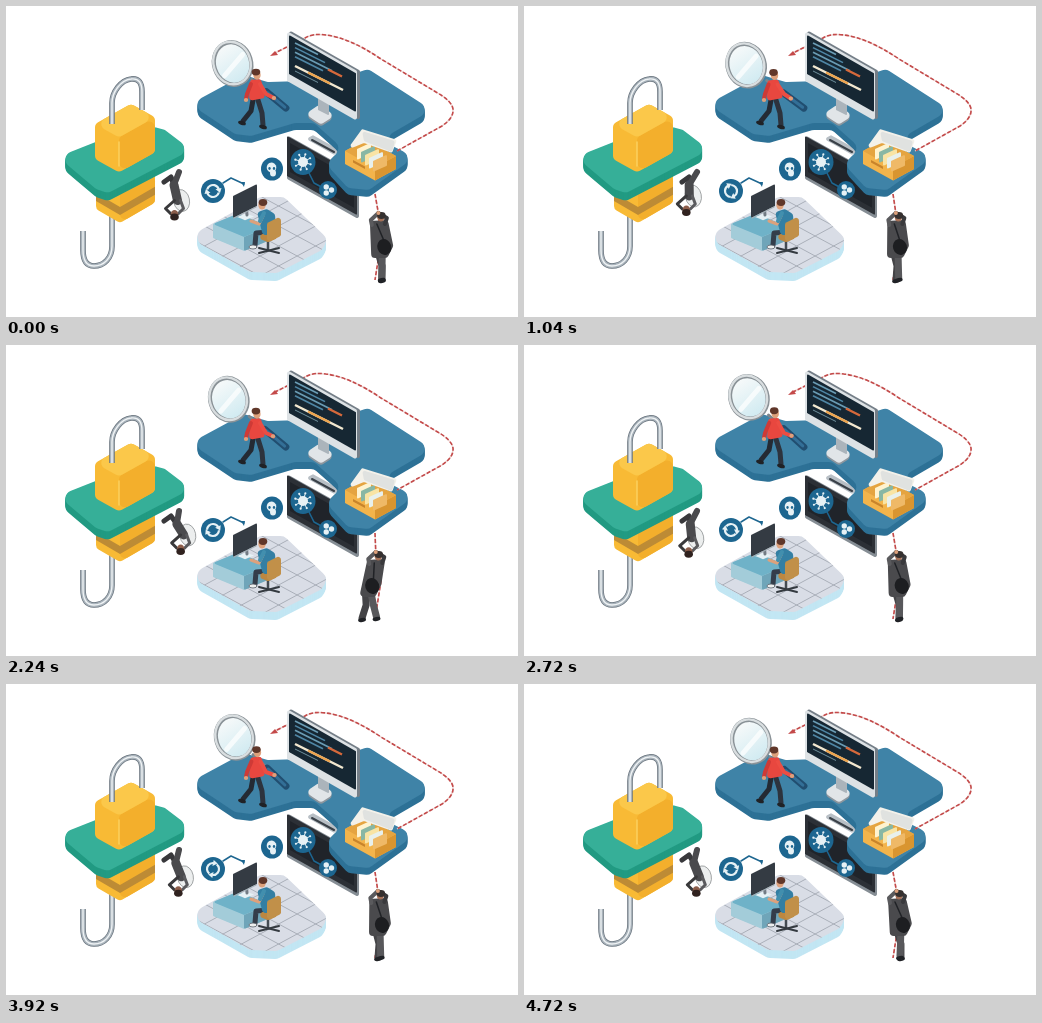
These frames come from a looping animation (512 px wide and 311 px high, 4.8 s). An HTML page with a canvas:

```html
<!DOCTYPE html>
<html lang="en">
<head>
<meta charset="utf-8">
<title>Data security scene</title>
<style>
html, body { margin: 0; width: 100%; height: 100%; overflow: hidden; background: #fff; }
canvas { display: block; width: 512px; height: 311px; }
</style>
</head>
<body>
<canvas id="stage" width="512" height="311"></canvas>
<script>
const ctx = document.getElementById('stage').getContext('2d');
const LOOP = 4800, STEP = 80, TAU = Math.PI * 2;
const SKIN = '#dda17c', HAIR = '#60372a', SUIT = '#4a4a4d', INK = '#202226';
const BLUE = '#1d6690', PALE = '#e6f1f5', RED = '#c44a4a';

// Wave with a whole number of cycles per loop; peak is a fraction of one cycle.
const wave = (t, cycles, peak = 0) => Math.cos(TAU * (t / LOOP * cycles - peak));
const shift = (p, dx, dy) => p.map(([x, y]) => [x + dx, y + dy]);

function tracePoly(p, r) {
  const last = p[p.length - 1];
  ctx.beginPath();
  ctx.moveTo((last[0] + p[0][0]) / 2, (last[1] + p[0][1]) / 2);
  p.forEach((a, i) => ctx.arcTo(...a, ...p[(i + 1) % p.length], r));
  ctx.closePath();
}
function poly(p, fill, r = 0) {
  tracePoly(p, r);
  ctx.fillStyle = fill;
  ctx.fill();
}
function line(p, color, w = 1, cap = 'round') {
  ctx.beginPath();
  p.forEach(q => ctx.lineTo(...q));
  ctx.lineWidth = w;
  ctx.lineCap = cap;
  ctx.lineJoin = 'round';
  ctx.strokeStyle = color;
  ctx.stroke();
}
function oval(x, y, rx, ry, fill, tilt = 0, edge, w = 1) {
  ctx.beginPath();
  ctx.ellipse(x, y, rx, ry, tilt, 0, TAU);
  if (fill) { ctx.fillStyle = fill; ctx.fill(); }
  if (edge) { ctx.strokeStyle = edge; ctx.lineWidth = w; ctx.stroke(); }
}
function slab(p, r, depth, top, side) {
  for (let d = depth; d > 0; d--) poly(shift(p, 0, d), side, r);
  poly(p, top, r);
}
// Upright panel whose horizontal edges have slope k.
function panel(x, y, w, h, k, fill, r = 0) {
  poly([[x, y], [x + w, y + w * k], [x + w, y + w * k + h], [x, y + h]], fill, r);
}
// Flat parallelogram from its left corner: a runs right-down, b right-up.
function tile(x, y, a, b, k, fill, r = 0) {
  poly([[x, y], [x + b, y - b * k], [x + a + b, y + (a - b) * k], [x + a, y + a * k]], fill, r);
}
function box(x, y, a, b, h, k, [top, left, right], r = 0) {
  const rise = (a - b) * k;
  poly([[x, y], [x + b, y - b * k], [x + a + b, y + rise], [x + a + b, y + rise + h],
    [x + a, y + a * k + h], [x, y + h]], left, r);
  panel(x + a, y + a * k, b, h, -k, right, r);
  tile(x, y, a, b, k, top, r);
}
function tube(path) {
  const p = new Path2D(path);
  ctx.lineCap = 'butt';
  [['#66717b', 5.6], ['#a9b3bb', 4.2], ['#eef2f4', 1.4]].forEach(([color, w]) => {
    ctx.strokeStyle = color;
    ctx.lineWidth = w;
    ctx.stroke(p);
  });
}
function head(x, y, hairX, hairY, skin = SKIN, hair = HAIR) {
  oval(x, y, 3.7, 4.6, skin);
  oval(x + hairX, y + hairY, 4.3, 3.4, hair);
}
function ropeLine(path, offset = 0) {
  const p = new Path2D(path);
  ctx.lineCap = 'butt';
  ctx.strokeStyle = '#ecd2d0';
  ctx.lineWidth = 1.4;
  ctx.stroke(p);
  ctx.setLineDash([4, 2]);
  ctx.lineDashOffset = offset;
  ctx.strokeStyle = RED;
  ctx.lineWidth = 1.6;
  ctx.stroke(p);
  ctx.setLineDash([]);
}

function lockScene(t) {
  const yellow = ['#fbc84a', '#f8ba35', '#f3af2c'];
  tube('M106 208V240C106 252 98 260 88 260C79 260 77 252 77 244V225');
  box(90, 173, 24, 35, 30, 0.58, yellow, 5);
  panel(90, 187, 24, 8, 0.58, '#bd8b35');
  panel(114, 201, 35, 8, -0.58, '#bd8b35');
  upsideDownMan(t);
  slab([[52, 151], [92, 135], [148, 121], [159, 124], [185, 144], [102, 187], [90, 183]],
    8, 8, '#36af98', '#219a82');
  box(89, 118, 24, 36, 35, 0.56, yellow, 6);
  line([[113, 136], [113, 160]], '#fbd15f', 1.5);
  tube('M106 118V97C106 86 115 74 125 73C133 72 136 77 136 86V104');
}

// Swings like a pendulum from the underside of the platform.
function upsideDownMan(t) {
  const swing = -wave(t, 6, 0.25);
  const x = 168.5 + 6.5 * swing, y = 209.5 - 5 * swing * swing;
  const hip = [168 + 3 * swing, 179], chest = [x + 3, y - 15];
  oval(x + 7, y - 15, 8, 11, '#eceeee', -0.2, '#8b8e90', 0.8);
  line([[158, 176], [165, 171], hip], '#38383b', 5);
  line([[173, 166], hip], SUIT, 6);
  line([hip, chest], SUIT, 9);
  [-1, 1].forEach(side => line([[chest[0] + 3 * side, chest[1]], [x + 9 * side, y - 7],
    [x + 4 * side, y - 2]], side < 0 ? '#39393b' : '#5a5a5d', 3));
  head(x, y - 1, 0, 2.5, '#8c5d4a', '#30221f');
}

function lowerMonitor() {
  panel(281, 129, 72, 44, 0.56, '#858d94', 2);
  panel(281, 130, 70, 40, 0.56, '#2c3036', 1);
  panel(284, 137, 64, 29, 0.56, '#20242a');
  tile(300, 133, 28, 7, 0.56, '#b8bfc5', 2);
  line([[306, 134], [328, 146]], '#3a4148', 2);
  line([[302, 165], [308, 177], [321, 184]], BLUE, 1.6);
  oval(297, 156, 12.5, 13, BLUE);
  for (let i = 0; i < 8; i++) {
    const a = i * TAU / 8 + 0.3, tip = [297 + 8 * Math.cos(a), 156 + 8 * Math.sin(a)];
    line([[297, 156], tip], PALE, 1);
    oval(...tip, 1.1, 1.1, PALE);
  }
  oval(297, 156, 5, 5, PALE);
  oval(322, 184, 9, 9, BLUE);
  for (let i = 0; i < 3; i++) {
    const a = i * TAU / 3;
    oval(322 + 3.5 * Math.cos(a), 184 + 3.5 * Math.sin(a), 2.7, 2.7, PALE);
  }
  oval(266, 163, 11, 11.5, BLUE);
  oval(265.5, 161.5, 4.8, 5, PALE, 0.3);
  oval(267, 167, 3, 3.5, PALE);
  [263.5, 268].forEach(x => oval(x, 162.5, 1.2, 1.4, BLUE));
}
function bluePlatform() {
  slab([[184, 98], [238, 69], [262, 76], [330, 74], [362, 63], [426, 104], [374, 134],
    [409, 151], [363, 184], [342, 182], [320, 158], [336, 142], [308, 117], [289, 117],
    [245, 130], [229, 128]], 8, 7, '#3f83a7', '#2d7196');
}
function upperMonitor() {
  tile(299, 110, 16, 14, 0.65, '#8d969e', 4);
  tile(299, 108, 16, 14, 0.65, '#e1e5e8', 4);
  panel(312, 88, 11, 16, 0.5, '#abb4bb', 1);
  panel(283, 24, 71, 50, 0.57, '#747e87', 2);
  panel(281, 25, 70, 50, 0.57, '#dde2e5', 2);
  panel(283, 29, 67, 39, 0.57, '#162733', 1);
  const code = (from, to, y, color, w = 1.6) =>
    line([from, to].map(x => [x, y + (x - 289) * 0.5]), color, w, 'butt');
  for (let i = 0; i < 4; i++) code(289, 312 + (i * 7) % 16, 37 + i * 4.6, i % 2 ? '#4f87a6' : '#6b9db5');
  code(322, 336, 47, '#d6693b', 2.4);
  code(289, 337, 60, '#f3e8d0', 2.4);
  code(302, 324, 60, '#eda44e', 2.4);
  code(289, 312, 65, '#6e909d', 1);
}
function fileBox() {
  box(339, 145, 30, 21, 13, 0.55, ['#e5a440', '#f3b44b', '#d99530']);
  ['#fff3cf', '#88b7a4', '#f9e4a4', '#e8f0ec', '#efb967'].forEach((color, i) =>
    panel(351 + i * 4, 143 + i * 3, 14, 11, -0.45, color, 1));
  poly([[341, 144], [356, 123], [391, 134], [386, 147], [358, 137]], '#f3f1ea', 2);
  poly([[356, 125], [389, 135], [386, 146], [358, 135]], '#e0e2e0', 2);
  panel(347, 154, 12, 2.5, 0.55, '#c8842b');
}
function dataRoute(t) {
  ropeLine('M391 145L436 120Q448 112 447 103Q446 95 430 86L375 53Q344 32 320 29Q307 27 299 32L269 47',
    -t / LOOP * 60);
  poly([[264, 50], [269, 45], [272, 49]], RED);
}

// The arm sweeps the glass sideways while it reaches slightly in and out.
function searcher(t) {
  const sweep = 3.3 * wave(t, 1, 0.74), reach = 1.8 * wave(t, 1);
  const x = 225 + sweep + reach, y = 55.5 - sweep + reach;
  const at = u => [x + (281 - x) * u, y + (103 - y) * u];
  const hx = 250 + sweep * 0.15, hy = 68 - sweep * 0.15, hand = at(0.76);
  line([[247, 94], [245, 105], [237, 115]], '#242a33', 5);
  line([[252, 94], [256, 107], [257, 119]], '#2d333d', 5);
  oval(236, 117, 4, 2, INK, 0.3);
  oval(257, 121, 4, 2, INK, 0.3);
  line([at(0.35), at(0.7)], '#7b858d', 3);
  line([at(0.62), at(0.98)], '#214e70', 7);
  line([at(0.64), at(0.96)], '#336f97', 3);
  const glass = ctx.createLinearGradient(x - 12, y - 18, x + 12, y + 18);
  glass.addColorStop(0, '#f8fafa');
  glass.addColorStop(1, '#cfeaf1');
  oval(x, y, 18.5, 21.5, glass, -0.3, '#8a9297', 4.2);
  oval(x - 0.6, y - 0.5, 18.5, 21.5, null, -0.3, '#d9dee0', 2.4);
  line([[x - 8, y + 12], [x + 10, y - 9]], 'rgba(255,255,255,.7)', 5);
  poly([[hx - 6, hy + 6], [hx + 5, hy + 5], [259, 92], [243, 95]], '#e8473f', 3);
  line([[hx - 5, hy + 10], [241, 88], [240, 93]], '#cf3a36', 4);
  line([[hx + 4, hy + 10], [260, 88], hand], '#ec4d43', 4);
  [[240, 94], hand].forEach(p => oval(...p, 2.2, 2, SKIN));
  head(hx + 1, hy + 1, -1, -3);
}

// The climber kicks his legs left and back on the rope.
function climber(t) {
  const s = wave(t, 5, 0.93);
  const top = [373.5 + 1.5 * s, 211], hip = [368 + 7 * s, 244], grip = [371 + 1.5 * s, 207];
  const feet = [[365.5 + 11.5 * s, 275], [373 + 3 * s, 274]];
  ropeLine(`M369 188L${grip}L375 236L369 274`);
  feet.forEach(([x, y], i) => {
    line([[hip[0] - 3 + 5 * i, hip[1]], [(x + hip[0]) / 2 + 1, 260], [x, y - 2]], i ? '#58585b' : '#444447', 7);
    oval(x, y, 4, 2, INK, -0.2);
  });
  poly([[top[0] - 11, 215], [top[0] + 7, 214], [hip[0] + 13, 240], [hip[0] + 7, 252],
    [hip[0] - 9, 252]], SUIT, 4);
  line([[top[0] - 9, 219], [top[0] - 10, 214], grip], '#5a5a5d', 4);
  line([[top[0] + 4, 218], [top[0] + 6, 212], grip], '#39393c', 4);
  line([[top[0] - 4, 218], [hip[0] + 5, 238]], INK, 1.5);
  oval(hip[0] + 4, 241, 7, 8, '#1d1e21', -0.3);
  head(...top, 0.5, -1.5, '#a47057', '#35302f');
  oval(...grip, 2, 2, SKIN);
}

function office() {
  const floor = [[182, 231], [254, 191], [278, 191], [322, 233], [316, 244], [271, 267], [244, 266]];
  slab(floor, 9, 8, '#d9dde6', '#c2e6f3');
  ctx.save();
  tracePoly(floor, 9);
  ctx.clip();
  for (let y = 130; y < 340; y += 20) {
    line([[180, y], [330, y + 81]], '#a5abb5', 0.9);
    line([[180, y], [330, y - 81]], '#a5abb5', 0.9);
  }
  ctx.restore();

  box(207, 218, 31, 25, 14, 0.42, ['#6fb2c8', '#a3ccd9', '#6fa5b9'], 1);
  tile(231, 211, 8, 9, 0.4, PALE);
  line([[240, 198], [241, 209]], '#727b84', 3);
  panel(227, 190, 24, 22, -0.5, '#343b43', 1);
  line([[228, 212], [250, 201]], '#a4afb6', 1.2);

  line([[262, 235], [262, 244]], '#444b52', 2.5);
  for (const dy of [-2.5, 2.5]) line([[253, 244.5 + dy], [273, 244.5 - dy]], '#343a40', 2);
  line([[263, 226], [250, 227], [249, 239]], '#343d4a', 5);
  oval(247, 241, 4, 2, '#eceeee', 0, '#59606a', 0.8);
  tile(250, 231, 12, 13, 0.45, '#bd8740', 3);
  poly([[251, 206], [261, 203], [269, 208], [270, 226], [257, 230]], '#347fa3', 4);
  line([[257, 210], [253, 218], [245, 215]], SKIN, 3);
  line([[258, 207], [254, 215]], '#428fae', 4);
  panel(261, 217, 14, 20, -0.5, '#c19049', 3);
  head(256, 199, 1, -2.5);
}
function refreshBadge(t) {
  line([[217, 177], [225, 172], [238, 178]], BLUE, 1.5);
  poly([[235, 176], [239, 176], [238, 181]], BLUE);
  oval(207, 185, 12, 12, BLUE);
  ctx.save();
  ctx.translate(207, 185);
  ctx.rotate(t / LOOP * TAU);
  for (let i = 0; i < 2; i++) {
    ctx.beginPath();
    ctx.arc(0, 0, 6, Math.PI + 0.25, TAU - 0.3);
    ctx.strokeStyle = PALE;
    ctx.lineWidth = 2.2;
    ctx.lineCap = 'butt';
    ctx.stroke();
    poly([[2.5, -1.8], [8.5, -3], [7, 2]], PALE);
    ctx.rotate(Math.PI);
  }
  ctx.restore();
}

function draw(now) {
  const t = Math.floor(now % LOOP / STEP) * STEP;
  ctx.fillStyle = '#fff';
  ctx.fillRect(0, 0, 512, 311);
  lockScene(t);
  lowerMonitor();
  climber(t);
  bluePlatform();
  dataRoute(t);
  upperMonitor();
  fileBox();
  searcher(t);
  office();
  refreshBadge(t);
}
const start = performance.now();
function tick() {
  draw(performance.now() - start);
  requestAnimationFrame(tick);
}
tick();
</script>
</body>
</html>
```
